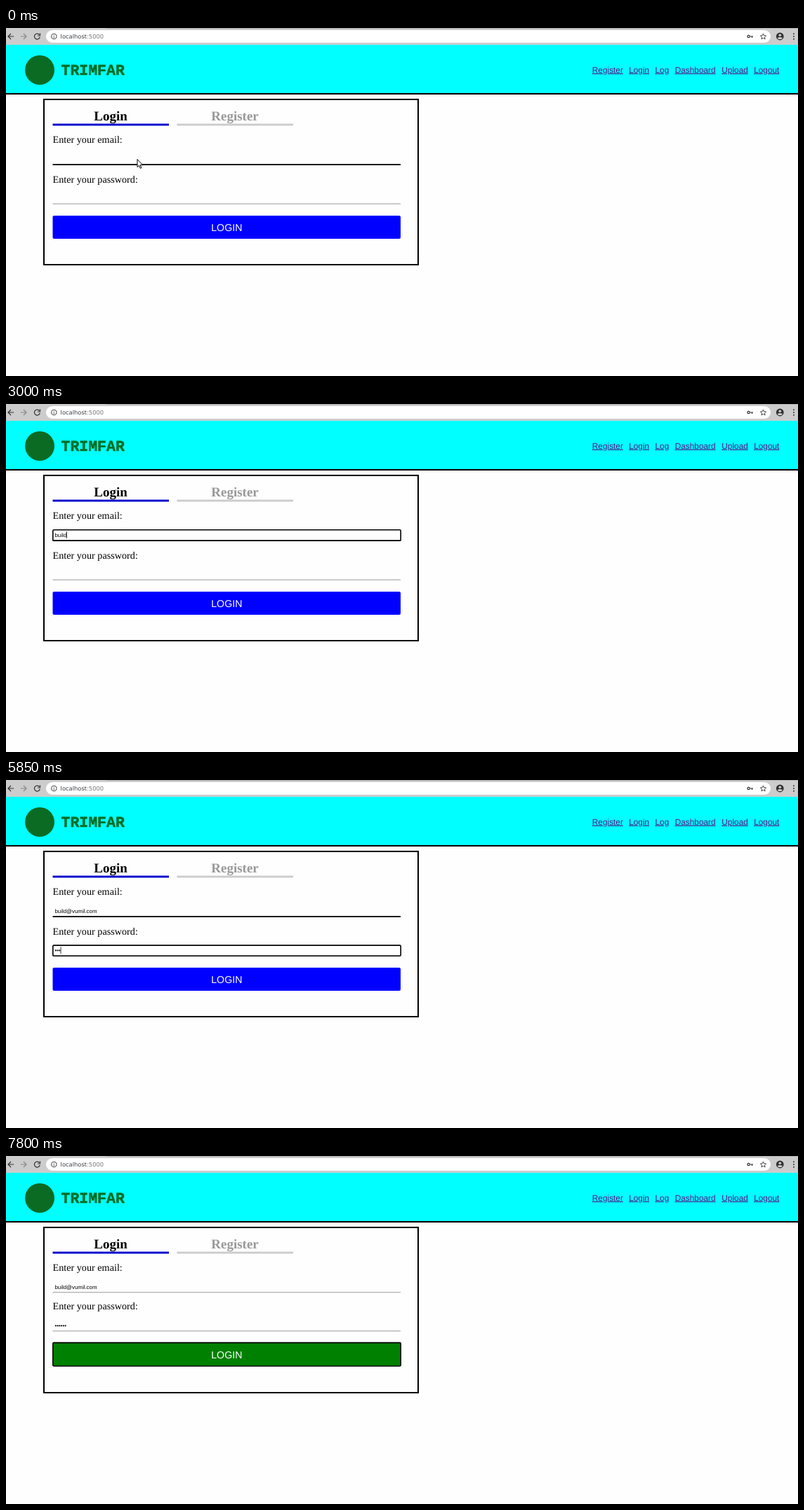
These frames come from a looping animation (1128 px wide and 497 px high, 8 s). An HTML page:

```html
<!DOCTYPE html>
<html lang="en">
<head>
<meta charset="utf-8">
<style>
  html, body { margin: 0; width: 100%; height: 100%; overflow: hidden; background: #fefefe; }
  svg { display: block; width: 1128px; height: 497px; text-rendering: geometricPrecision; }
  .ui { font: 8.35px "DejaVu Sans", sans-serif; fill: #3c4043; }
  .serif { font: 14.2px "Liberation Serif", serif; }
  .tab { font: bold 19px "Liberation Serif", serif; text-anchor: middle; }
  .nav { font: 11.85px "Liberation Sans", sans-serif; fill: #551a8b; text-decoration: underline; }
  .field { font: 7.88px "Liberation Sans", sans-serif; }
  .button { font: 14.25px "Liberation Sans", sans-serif; fill: #fff; text-anchor: middle; }
  .brand { font: bold 21.5px "Liberation Mono", monospace; fill: #0b6b22; stroke: #0b6b22; stroke-width: .5; }
  .line { fill: none; stroke: #333; stroke-width: 1.2; }
  .ring { fill: none; stroke: #000; stroke-width: 1.6; }
</style>
</head>
<body>
<svg viewBox="0 0 1128 497">
  <!-- browser toolbar -->
  <rect width="1128" height="24" fill="#ccc"/>
  <rect x="143" width="985" height="1" fill="#b0b0b0"/>
  <rect x="57" y="3" width="1032" height="18" rx="9" fill="#fff"/>
  <g class="line">
    <path d="M11 12H3M7 8L3 12L7 16"/>
    <path d="M21 12H29M25 8L29 12L25 16" stroke="#888"/>
    <path d="M47.5 9.5A4 4 0 1 0 48.3 13M48.5 7.5V11H45"/>
    <circle cx="68.3" cy="12" r="3.8" stroke-width=".9"/>
    <path d="M68.3 11.5V14.2M68.3 9.6V10.5" stroke-width=".9"/>
    <circle cx="1057.6" cy="12" r="1.7"/>
    <path d="M1059.3 12H1064M1062.5 12V14"/>
    <path d="M1078.5 8L1079.7 10.8L1082.6 11L1080.4 13L1081.1 15.9L1078.5 14.3L1075.9 15.9L1076.6 13L1074.4 11L1077.3 10.8Z" stroke-width=".9"/>
  </g>
  <circle cx="1102.3" cy="12" r="5.4" fill="#333"/>
  <circle cx="1102.3" cy="10.2" r="1.8" fill="#ccc"/>
  <ellipse cx="1102.3" cy="14.5" rx="3.2" ry="1.5" fill="#ccc"/>
  <g fill="#333"><circle cx="1122" cy="8.3" r="1"/><circle cx="1122" cy="12" r="1"/><circle cx="1122" cy="15.7" r="1"/></g>
  <text class="ui" x="77.6" y="15">localhost<tspan fill="#777">:5000</tspan></text>

  <!-- page header -->
  <rect y="24" width="1128" height="70" fill="#0ff"/>
  <rect y="93" width="1128" height="2" fill="#000"/>
  <circle cx="48" cy="60" r="21" fill="#0b6b22"/>
  <text class="brand" x="78.5" y="67.3">TRIMFAR</text>
  <g id="nav"></g>

  <!-- form -->
  <rect x="54" y="102" width="533" height="236" fill="none" stroke="#000" stroke-width="2"/>
  <text class="tab" x="149" y="132">Login</text>
  <text class="tab" x="326" y="132" fill="#999">Register</text>
  <rect x="66.5" y="136.6" width="165.5" height="2.9" fill="#0000cd"/>
  <rect x="243.5" y="136.6" width="165.5" height="2.9" fill="#ccc"/>
  <text class="serif" x="66.5" y="164">Enter your email:</text>
  <rect id="emailLine" x="66.5" width="495.5"/>
  <rect id="emailRing" class="ring" x="66.8" y="179.8" width="495.4" height="15.4" rx="1.5"/>
  <text id="email" class="field" x="69.4" y="189.7"></text>
  <g id="lower">
    <text class="serif" x="66.5" y="220.5">Enter your password:</text>
    <rect x="66.5" y="250.5" width="495.5" height="1.2" fill="#aaa"/>
    <rect id="passRing" class="ring" x="66.8" y="236.1" width="495.4" height="15.2" rx="1.5"/>
    <text id="pass" class="field" x="69.4" y="246"></text>
    <rect id="button" x="66.5" y="268" width="495.5" height="33" rx="2"/>
    <rect id="buttonRing" class="ring" x="66.8" y="267.8" width="495.4" height="33.4" rx="1.5"/>
    <text class="button" x="314.3" y="290">LOGIN</text>
  </g>
  <rect id="caret" width=".9" height="10" fill="#222"/>

  <!-- suggestions -->
  <g id="menu">
    <rect x="66.5" y="197" width="122" height="69.5" rx="2" fill="#000" opacity=".1"/>
    <rect x="66.8" y="196.4" width="121" height="68.8" rx="1.5" fill="#fff" stroke="#ddd" stroke-width=".6"/>
    <rect x="67" y="240.2" width="120.5" height=".8" fill="#ddd"/>
    <circle cx="78.4" cy="219" r="3.5" fill="#fff" stroke="#555"/>
    <path d="M75.2 217.5L78 219.5L77.5 222.3L75.7 221ZM78 215.6L80.5 216.5L79 218.5L81.5 219.5L80 222Z" fill="#555"/>
    <text class="ui" x="90.2" y="215.3">7@vumil.com</text>
    <g fill="#333"><circle cx="93" cy="225.2" r="1.3"/><circle cx="97.5" cy="225.2" r="1.3"/><circle cx="102" cy="225.2" r="1.3"/></g>
    <text class="ui" x="73.4" y="256.2">Manage passwords...</text>
  </g>
  <path id="pointer" d="M187 187.5V198.6L189.5 196.3L191.3 200.4L193 199.7L191.2 195.7H194.7Z" fill="#fff" stroke="#000" stroke-width="1"/>
</svg>
<script>
const $ = id => document.getElementById(id);
const show = (id, on) => $(id).setAttribute('visibility', on ? 'visible' : 'hidden');
const set = (id, attrs) => { for (const k in attrs) $(id).setAttribute(k, attrs[k]); };

const links = { Register: 834.8, Login: 887.2, Log: 924.5, Dashboard: 952.7, Upload: 1019.3, Logout: 1065.2 };
$('nav').innerHTML = Object.entries(links)
  .map(([name, x]) => `<text class="nav" x="${x}" y="63.7">${name}</text>`).join('');

// [time, characters typed]
const emailKeys = [[2250, 1], [2550, 2], [2700, 3], [2850, 4], [3000, 5], [3150, 6], [3300, 7],
  [3450, 8], [3600, 10], [3900, 11], [4050, 12], [4200, 13], [4350, 15]];
const passKeys = [[5400, 1], [5550, 2], [5850, 3], [6300, 5], [6600, 6]];
const typed = (keys, t) => keys.reduce((n, [at, count]) => t >= at ? count : n, 0);
const within = (t, a, b) => t >= a && t < b;

function draw(t) {
  const inEmail = within(t, 450, 4650), inPass = within(t, 4650, 7800);
  const hover = t >= 7350, clicked = t >= 7800;

  show('pointer', t < 150);
  show('emailRing', inEmail);
  show('passRing', inPass);
  show('buttonRing', clicked);
  show('menu', within(t, 450, 2550));
  set('menu', { opacity: t < 2400 ? 1 : .8 });

  set('emailLine', hover ? { y: 194.1, height: 1.2, fill: '#aaa' } : { y: 194.2, height: 1.8, fill: '#000' });
  set('lower', { transform: `translate(0 ${hover ? -1.2 : 0})` });
  set('button', { fill: hover ? '#008000' : '#0000ff' });

  $('email').textContent = 'build@vumil.com'.slice(0, typed(emailKeys, t));
  $('pass').textContent = '•'.repeat(typed(passKeys, t));

  const field = $(inEmail ? 'email' : 'pass');
  const blinkOff = within(t, 1050, 1650) || within(t, 5250, 5400) || t >= 7200;
  show('caret', (inEmail || inPass) && !blinkOff);
  set('caret', { x: 69.3 + field.getComputedTextLength(), y: inEmail ? 182 : 238.4 });
}

const start = performance.now();
function tick() {
  draw((performance.now() - start) % 8000);
  requestAnimationFrame(tick);
}
tick();
</script>
</body>
</html>
```
